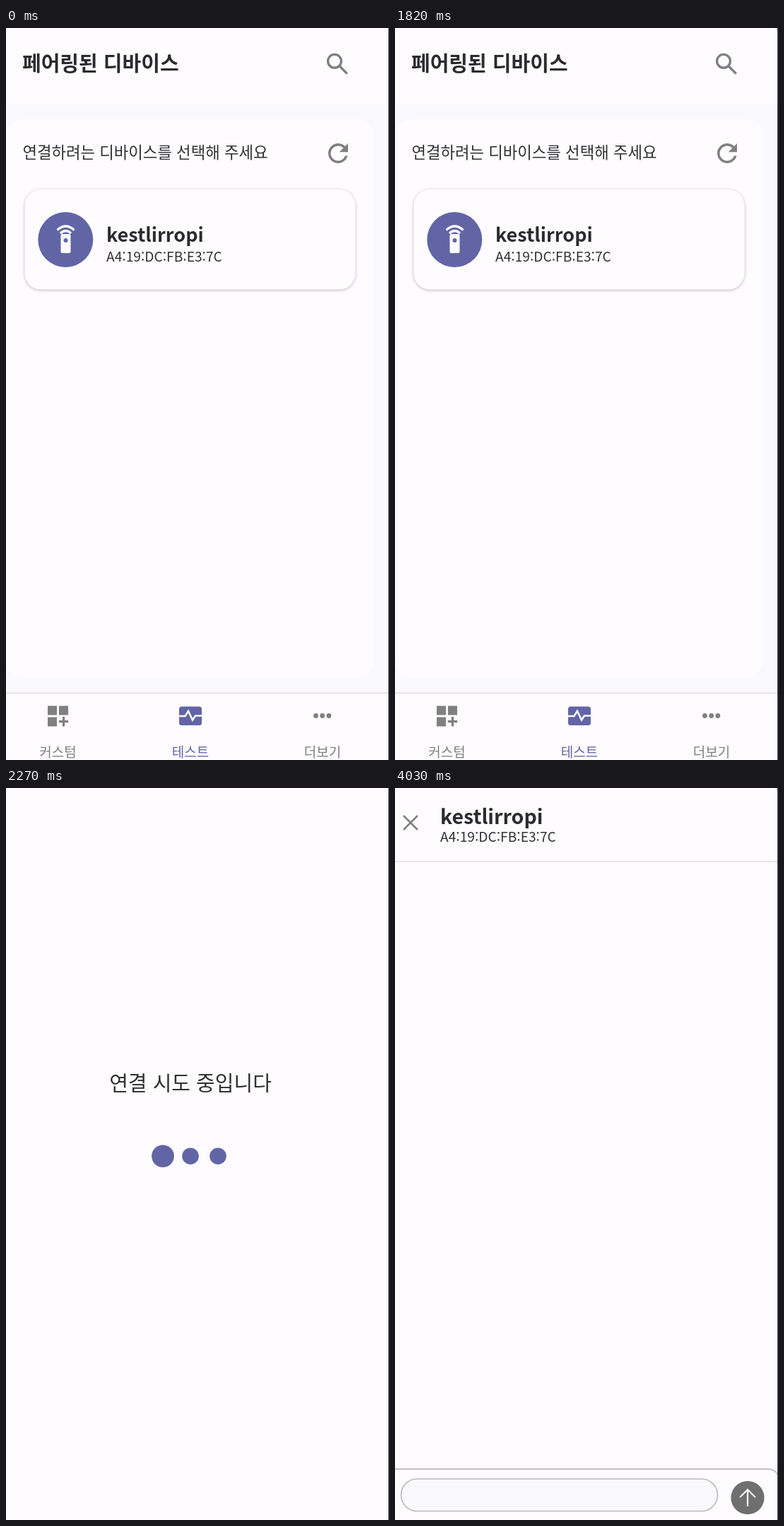
An HTML page that plays this animation: 542 px wide and 1034 px high, repeating every 4.27 s.

```html
<!DOCTYPE html>
<html lang="ko">
<head>
<meta charset="utf-8">
<style>
  html, body { margin: 0; width: 100%; height: 100%; overflow: hidden; background: #fefcff; }
  svg { display: block; width: 542px; height: 1034px; }
  text { font-family: "Noto Sans CJK KR", "Noto Sans CJK", "Noto Sans CJK JP", sans-serif; font-weight: 300; fill: #303033; }
  .strong { font-weight: 600; fill: #2b2b2e; }
  .label { font-size: 19px; text-anchor: middle; fill: #808080; }
  .mid { text-anchor: middle; }
  .paper { fill: #fefcff; }
  .grey { fill: #808080; }
  .accent { fill: #6165a6; }
  .line { fill: none; stroke: #808080; }
  .white { fill: none; stroke: #fefcff; }
  #card { filter: drop-shadow(0 1px 2px #0004); }
</style>
</head>
<body>
<svg viewBox="0 0 542 1034">
  <g id="list">
    <rect class="paper" width="542" height="1034"/>
    <rect y="108" width="542" height="831" fill="#faf9fc"/>
    <text class="strong" x="23" y="60.5" font-size="29">페어링된 디바이스</text>
    <g class="line" stroke-width="3.4">
      <circle cx="465" cy="46.8" r="9.4"/>
      <path d="M471.5 53.3 482.8 64.6"/>
    </g>

    <rect class="paper" x="1" y="129" width="519" height="789" rx="22"/>
    <text x="23.5" y="184" font-size="22.3">연결하려는 디바이스를 선택해 주세요</text>
    <path class="grey" transform="translate(449 156) scale(1.75)"
      d="M17.65 6.35A7.96 7.96 0 0 0 12 4a8 8 0 1 0 7.73 10h-2.08A6 6 0 1 1 12 6c1.66 0 3.14.69 4.22 1.78L13 11h7V4z"/>

    <rect id="card" class="paper" x="26.5" y="228" width="468" height="141.5" rx="23"/>
    <circle class="accent" cx="84.3" cy="299" r="39"/>
    <rect class="paper" x="77.5" y="291" width="14" height="27" rx="2"/>
    <circle class="accent" cx="84.5" cy="300" r="3"/>
    <path class="white" stroke-width="3.2" d="M72.5 285.5Q84.5 274.5 96.5 285.5M77 290Q84.5 283 92 290"/>
    <text class="strong" x="142" y="302" font-size="27">kestlirropi</text>
    <text x="142" y="330" font-size="19.2">A4:19:DC:FB:E3:7C</text>

    <path d="M0 939.5H542" stroke="#ebe9ed" stroke-width="3"/>
    <rect class="paper" y="941" width="542" height="93"/>
    <path class="grey" d="M59 957.5h13v13h-13zM75 957.5h13v13h-13zM59 973.5h13v13h-13z"/>
    <path class="line" stroke-width="3.2" d="M81.5 973v13.5M74.8 979.7h13.4"/>
    <rect class="accent" x="245" y="958.5" width="32" height="26.5" rx="3.5"/>
    <path class="white" stroke-width="2.6" d="M245 972h8.5l4.5-7 6 12.5 4-6h9"/>
    <g class="grey">
      <circle cx="438.5" cy="971.5" r="3.4"/>
      <circle cx="447.7" cy="971.5" r="3.4"/>
      <circle cx="456.9" cy="971.5" r="3.4"/>
    </g>
    <text class="label" x="73.5" y="1030">커스텀</text>
    <text class="label" x="261" y="1030" style="fill:#6165a6">테스트</text>
    <text class="label" x="448" y="1030">더보기</text>
  </g>

  <g id="sheet">
    <rect class="paper" width="542" height="1110"/>
    <text class="mid" x="261" y="496" font-size="29">연결 시도 중입니다</text>
    <g id="dots" class="accent">
      <circle cx="222" cy="588"/>
      <circle cx="261" cy="588"/>
      <circle cx="300" cy="588"/>
    </g>
  </g>

  <g id="chat">
    <rect class="paper" width="542" height="1034"/>
    <path class="line" stroke-width="2.6" d="M12 39 32 59M32 39 12 59"/>
    <text class="strong" x="64" y="51" font-size="28.5">kestlirropi</text>
    <text x="64" y="76" font-size="19.2">A4:19:DC:FB:E3:7C</text>
    <path d="M0 104H542" stroke="#e9e7eb" stroke-width="2"/>
    <path d="M-2 962H527Q540 962 543 974" fill="none" stroke="#c2c0c4" stroke-width="1.8"/>
    <rect x="8.5" y="976" width="448" height="45.5" rx="22.7" fill="#faf9fc" stroke="#bbb9bd" stroke-width="1.6"/>
    <circle cx="499" cy="1002.5" r="23.6" fill="#6f6f70"/>
    <path class="white" stroke-width="2.2" d="M499 1014.5V991M488 1002 499 991 510 1002"/>
  </g>
  <path d="M541.5 0V1034" stroke="#4a4a4c"/>
</svg>
<script>
  const LOOP = 4270, SLIDE_AT = 2038, SLIDE_MS = 125, CHAT_AT = 2540, FADE_MS = 50;
  const [sheet, chat] = ['sheet', 'chat'].map(id => document.getElementById(id));
  const dots = [...document.querySelectorAll('#dots circle')];
  const clamp = v => Math.min(1, Math.max(0, v));

  // cubic-bezier(0, 0, .2, 1)
  function decelerate(x) {
    let lo = 0, hi = 1;
    for (let i = 0; i < 20; i++) {
      const s = (lo + hi) / 2;
      if (.6 * (1 - s) * s * s + s ** 3 < x) lo = s; else hi = s;
    }
    return 3 * (1 - lo) * lo * lo + lo ** 3;
  }

  function draw(t) {
    const y = 1034 - 1102 * decelerate(clamp((t - SLIDE_AT) / SLIDE_MS));
    sheet.setAttribute('transform', `translate(0 ${y})`);
    sheet.style.display = t < SLIDE_AT ? 'none' : '';
    dots.forEach((dot, i) => {
      const p = clamp((t - SLIDE_AT - i * 235) / 500);
      dot.setAttribute('r', 11.8 + 5.7 * (1 - (1 - p) ** 2));
    });
    chat.style.opacity = clamp((t - CHAT_AT) / FADE_MS);
  }

  const start = performance.now();
  function tick() {
    draw((performance.now() - start) % LOOP);
    requestAnimationFrame(tick);
  }
  tick();
</script>
</body>
</html>
```
